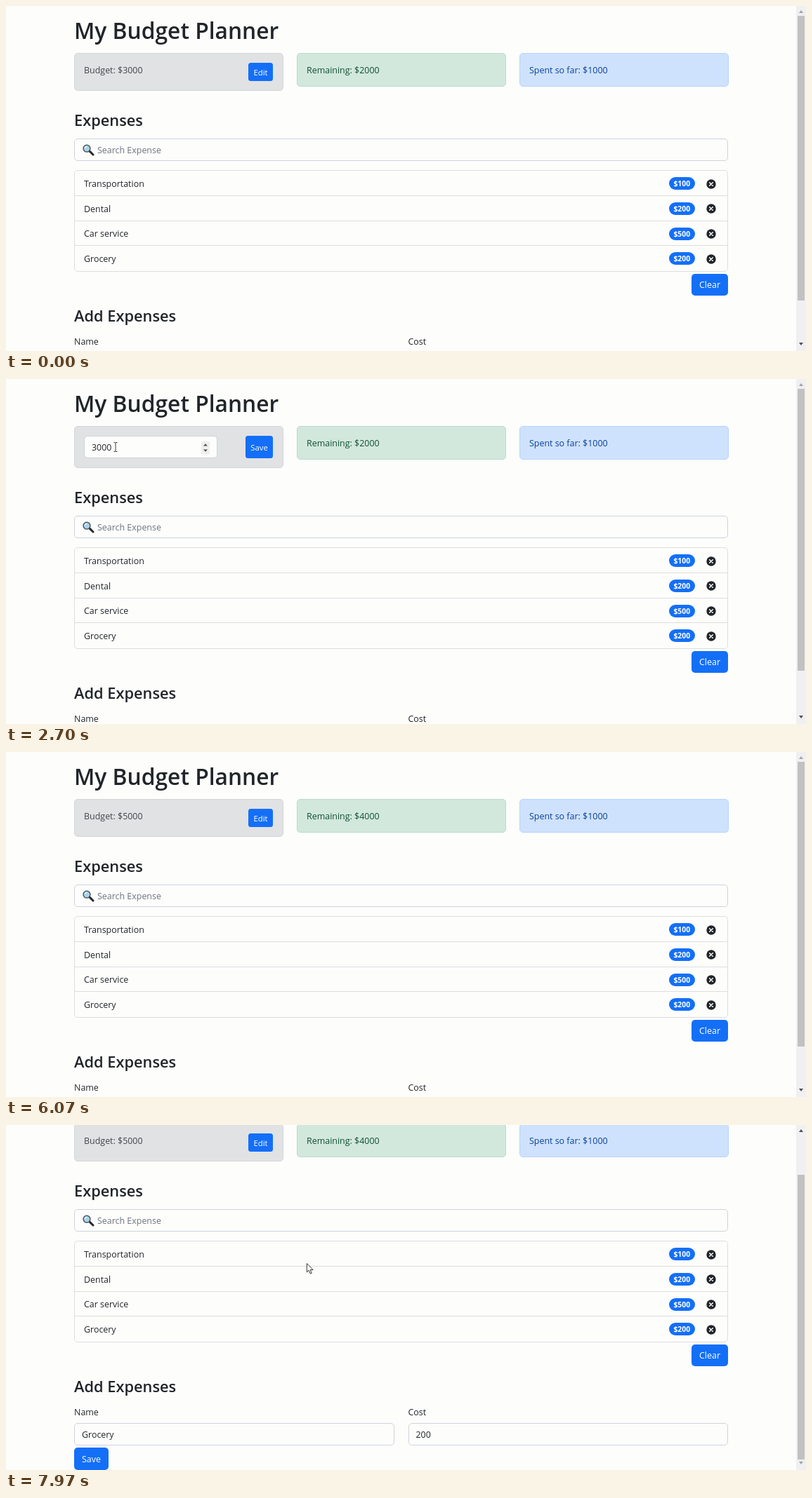
These frames come from a looping animation (1139 px wide and 492 px high, 8 s). An HTML page:

```html
<!DOCTYPE html>
<html lang="en">
<head>
<meta charset="utf-8">
<title>My Budget Planner</title>
<style>
  * { box-sizing: border-box; margin: 0; }
  html, body { width: 100%; height: 100%; overflow: hidden; background: #fdfdfc; }
  body { position: relative; font: 12.45px/20px "Open Sans", "Noto Sans", sans-serif; color: #212529; }
  .page, .rest, .box, p, h1, h2, .btn, .cursor, .cursor svg, .bar, .thumb, .tip, .layer { position: absolute; }
  .page, .rest, .layer { left: 0; top: 0; width: 1125px; height: 570px; }
  p, h1, h2 { white-space: pre; }
  h1 { font-size: 31.75px; font-weight: 600; line-height: 40px; left: 97px; top: 14.5px; }
  h2 { font-size: 21.8px; font-weight: 600; line-height: 28px; left: 97px; }

  .box { border: 1px solid #ced4da; border-radius: 5px; }
  .card { top: 67px; width: 297.5px; height: 48px; }
  .gray { left: 97px; height: 54px; background: #e1e2e3; border-color: #d3d6d8; color: #41464b; }
  .green { left: 414px; background: #d2e8dd; border-color: #badbcc; color: #0f5132; }
  .blue { left: 731px; background: #cfe2fd; border-color: #b6d4fe; color: #084298; }
  .card p { left: 13px; top: 14.2px; }
  .btn { background: #146ff7; color: #fff; border-radius: 5px; text-align: center; }
  .small { font-size: 11.3px; border-radius: 3.5px; }

  .row { position: relative; height: 35.8px; }
  .row:not(:last-child) { border-bottom: 1px solid #dcdedf; }
  .row p { left: 13px; top: 8.8px; }
  .row b {
    position: absolute; left: 846px; top: 9px; width: 36.5px; height: 18px;
    border-radius: 10px; background: #146ff7; color: #fff;
    font-size: 10.4px; line-height: 18.4px; text-align: center;
  }
  .row svg { position: absolute; left: 899px; top: 11.5px; }

  .bar { right: 0; top: 0; width: 14px; height: 100%; background: #f0f0f2; }
  .thumb { left: 2px; top: 14px; width: 10px; height: 406px; background: #c1c1c2; }
  .tip { left: 4px; border: 3px solid transparent; }
  .up { top: 3px; border-bottom: 4px solid #a3a3a3; }
  .down { bottom: 5px; border-top: 4px solid #505050; }

  .field { left: 111px; top: 80.5px; width: 190px; height: 32.5px; background: #fdfdfc; }
  .value { left: 122px; top: 87.7px; }
  .marked { background: #1a76d8; color: #fff; line-height: 18px; top: 88.7px; }
  .typed { overflow: hidden; height: 18px; line-height: 18px; top: 88.7px; box-sizing: content-box; border-right: 1px solid #212529; }
  .spin { position: absolute; left: 278px; top: 88.5px; }

  .cursor { left: 0; top: 0; }
  .cursor svg { overflow: visible; }

  /* Every timeline shares one 8 s loop. */
  .jump { animation: 8s step-end infinite; }
  .view { animation-name: view; }
  .edit { animation-name: edit; }
  .rest { animation-name: rest; }
  .before { animation-name: before; }
  .after { animation-name: after; }
  .hoverEdit { animation-name: hoverEdit; }
  .hoverSave { animation-name: hoverSave; }
  .field { animation-name: focus; }
  .stale { animation-name: stale; }
  .typed { animation-name: typed; }
  .spin { animation-name: spin; }
  .arrow { animation-name: arrow; }
  .hand { animation-name: hand; }
  .beam { animation-name: beam; }
  .up { animation-name: tipUp; }
  .down { animation-name: tipDown; }
  .marked { animation: marked 8s linear infinite; }
  .page { animation: scroll 8s linear infinite; }
  .thumb { animation: slide 8s linear infinite, shrink 8s step-end infinite; }
  .cursor { animation: move 8s linear infinite; }

  @keyframes view { 0%, 62.875% { visibility: visible } 27.125% { visibility: hidden } }
  @keyframes edit { 0%, 62.875% { visibility: hidden } 27.125% { visibility: visible } }
  @keyframes rest { 0%, 62.875% { transform: none } 27.125% { transform: translateY(6px) } }
  @keyframes shrink { 0%, 62.875% { height: 406px } 27.125% { height: 402px } }
  @keyframes before { 0% { opacity: 1 } 62.875%, to { opacity: 0 } }
  @keyframes after { 0% { opacity: 0 } 62.875%, to { opacity: 1 } }
  @keyframes hoverEdit { 0%, 27.125% { background: #146ff7 } 21.3% { background: #0f5fd3 } }
  @keyframes hoverSave { 0%, 32.1% { background: #146ff7 } 27.125% { background: #0f5fd3 } }
  @keyframes focus {
    0% { border-color: #ced4da; box-shadow: none }
    37.5%, to { border-color: #86b7fe; box-shadow: 0 0 0 3.3px #abc8f0 }
  }
  @keyframes stale { 0% { opacity: 1 } 50%, to { opacity: 0 } }
  @keyframes marked {
    0%, 37.5% { clip-path: inset(0 0 0 100%); opacity: 1 }
    39%, 49.99% { clip-path: inset(0); opacity: 1 }
    50%, to { clip-path: inset(0); opacity: 0 }
  }
  @keyframes typed {
    0% { width: 0; opacity: 0 }
    50% { width: 1ch; opacity: 1 }
    53.75% { width: 2ch; opacity: 1 }
    55.875% { width: 3ch; opacity: 1 }
    58.375%, to { width: 4ch; opacity: 1 }
  }
  @keyframes spin { 0% { opacity: 0 } 32.9%, to { opacity: 1 } }
  @keyframes arrow { 0%, 32.1%, 42.5% { opacity: 1 } 21.3%, 33% { opacity: 0 } }
  @keyframes hand { 0%, 32.1% { opacity: 0 } 21.3% { opacity: 1 } }
  @keyframes beam { 0%, 42.5% { opacity: 0 } 33% { opacity: 1 } }
  @keyframes tipUp { 0% { border-bottom-color: #a3a3a3 } 97.5%, to { border-bottom-color: #505050 } }
  @keyframes tipDown { 0% { border-top-color: #505050 } 99.3%, to { border-top-color: #a3a3a3 } }
  @keyframes scroll {
    0%, 97.4% { transform: none; animation-timing-function: ease-in-out }
    99.4%, to { transform: translateY(-69px) }
  }
  @keyframes slide {
    0%, 97.4% { transform: none; animation-timing-function: ease-in-out }
    99.4%, to { transform: translateY(57px) }
  }
  @keyframes move {
    0%, 10.8% { transform: translate(585px, 500px) }
    12.5% { transform: translate(596px, 405px); animation-timing-function: ease-in-out }
    20.8% { transform: translate(368px, 104px); animation-timing-function: ease-out }
    23%, 31.6% { transform: translate(359px, 92px); animation-timing-function: ease-in }
    32.5% { transform: translate(320px, 134px); animation-timing-function: ease-out }
    33.75%, 37.5% { transform: translate(156px, 97px); animation-timing-function: ease-in-out }
    42.875%, 69.6% { transform: translate(32px, 102px); animation-timing-function: ease-in }
    73% { transform: translate(12px, -22px) }
    73.01%, 94.4% { transform: translate(440px, -22px); animation-timing-function: ease-out }
    96.75%, to { transform: translate(428px, 197px) }
  }
</style>
</head>
<body>
<div class="page">
  <h1>My Budget Planner</h1>

  <div class="box card green"><p class="jump before">Remaining: $2000</p><p class="jump after">Remaining: $4000</p></div>
  <div class="box card blue"><p>Spent so far: $1000</p></div>

  <div class="layer jump view">
    <div class="box card gray"><p class="jump before">Budget: $3000</p><p class="jump after">Budget: $5000</p></div>
    <div class="btn small jump hoverEdit" style="left:345px;top:81px;width:35px;height:26px;line-height:27px">Edit</div>
  </div>

  <div class="layer jump edit">
    <div class="box card gray" style="height:60px"></div>
    <div class="box field jump"></div>
    <p class="value jump stale">3000</p>
    <p class="value marked">3000</p>
    <p class="value typed jump">5000</p>
    <svg class="spin jump" width="12" height="18"><path d="M0 0h12v18H0z" fill="#efefef"/><path d="M3 6.5 6 3.2 9 6.5zM3 11.5 6 14.8 9 11.5z" fill="#505050"/></svg>
    <div class="btn small jump hoverSave" style="left:341px;top:81px;width:39px;height:31.5px;line-height:33px">Save</div>
  </div>

  <div class="rest jump">
    <h2 style="top:148.9px">Expenses</h2>
    <div class="box" style="left:97px;top:189px;width:931px;height:32px"></div>
    <svg style="position:absolute;left:109px;top:197px" width="17" height="17">
      <path d="M9.6 9.6 15 15" stroke="#25282b" stroke-width="3" stroke-linecap="round"/>
      <circle cx="6" cy="6.2" r="4.9" fill="#a9d3ea" stroke="#4b555c" stroke-width="1.5"/>
      <path d="M3.4 6a2.8 2.8 0 0 1 2.8-2.6" fill="none" stroke="#eef8fc" stroke-width="1.2"/>
    </svg>
    <p style="left:130px;top:196px;color:#6c757d">Search Expense</p>

    <div class="box" id="list" style="left:97px;top:234px;width:931px;height:145px;border-color:#dcdedf"></div>
    <div class="btn" style="left:976px;top:382px;width:52px;height:31px;line-height:32.6px">Clear</div>

    <h2 style="top:427.9px">Add Expenses</h2>
    <p style="left:97px;top:468.7px">Name</p>
    <p style="left:572.5px;top:468.7px">Cost</p>
    <div class="box" style="left:97px;top:494px;width:456px;height:32px"></div>
    <div class="box" style="left:572.5px;top:494px;width:455.5px;height:32px"></div>
    <p style="left:108px;top:501px">Grocery</p>
    <p style="left:583.5px;top:501px">200</p>
    <div class="btn" style="left:97px;top:529px;width:49px;height:32px;line-height:33px">Save</div>
  </div>
</div>

<div class="bar">
  <div class="tip up jump"></div>
  <div class="thumb"></div>
  <div class="tip down jump"></div>
</div>

<div class="cursor">
  <svg class="arrow jump" width="10" height="16">
    <path d="M.4.5V12.8L3.2 10.2 5.2 15 7.2 14.1 5.2 9.5H9.1Z" fill="#fff" stroke="#222" stroke-width=".9"/>
  </svg>
  <svg class="hand jump" style="left:-4px" width="13" height="17">
    <path d="M3.5 9.8V1.6Q4.6-.2 5.7 1.6V6Q7 5 7.8 6.4 9 5.4 9.8 6.8 11.6 6 12 8V11.6L10.6 16H4.8L.8 10Q.8 8 2.4 8.8Z" fill="#fff" stroke="#222" stroke-width=".8"/>
  </svg>
  <svg class="beam jump" style="left:-3px;top:-7px" width="6" height="14">
    <path d="M.5.5H2.2L3 1.2 3.8.5H5.5M3 1.2V12.8M.5 13.5H2.2L3 12.8 3.8 13.5H5.5" fill="none" stroke="#222" stroke-width=".9"/>
  </svg>
</div>

<script>
  const items = [["Transportation", 100], ["Dental", 200], ["Car service", 500], ["Grocery", 200]];
  const remove = `<svg width="14" height="14"><circle cx="7" cy="7" r="6.7" fill="#212529"/>
    <path d="M4.7 4.7 9.3 9.3M9.3 4.7 4.7 9.3" stroke="#fff" stroke-width="1.5" stroke-linecap="round"/></svg>`;
  document.getElementById("list").innerHTML = items
    .map(([name, cost]) => `<div class="row"><p>${name}</p><b>$${cost}</b>${remove}</div>`)
    .join("");
</script>
</body>
</html>
```
